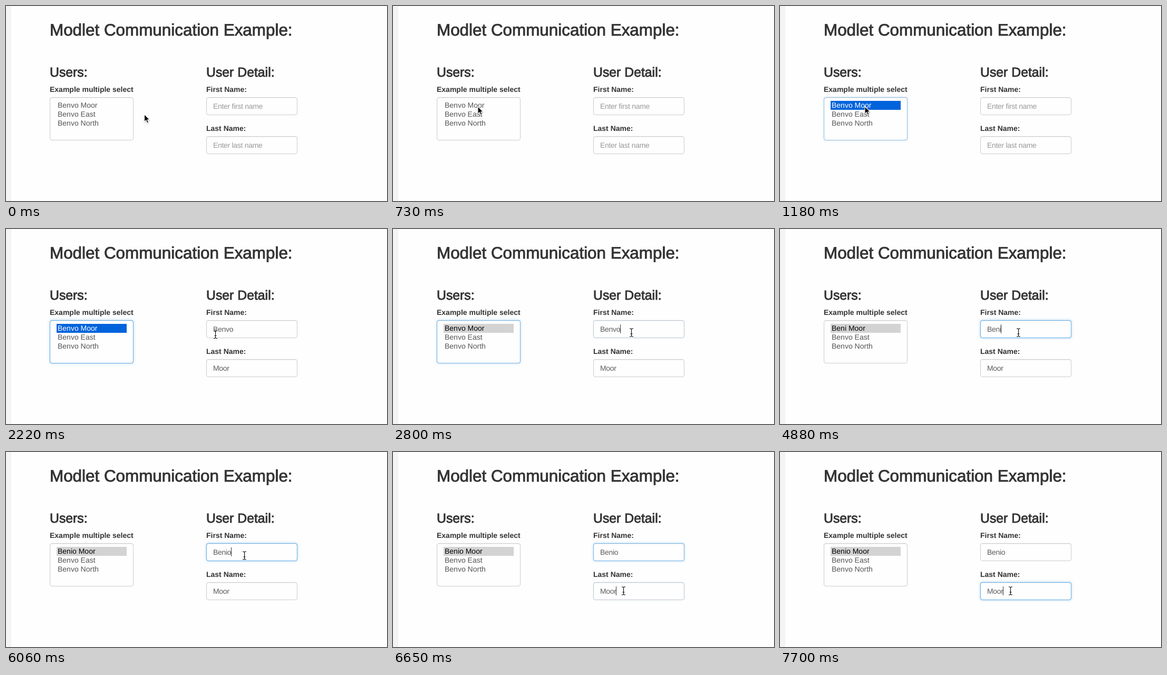
These frames come from a looping animation (723x370 px, 8 s). An HTML page:

```html
<!DOCTYPE html>
<html lang="en">
<head>
<meta charset="utf-8">
<title>Modlet Communication Example</title>
<style>
  html, body { margin: 0; width: 100%; height: 100%; overflow: hidden; background: #fefefe; }
  .strip { position: absolute; left: 0; top: 0; width: 10px; height: 100%; background: #f4f4f4; }
  .field, .ring { position: absolute; box-sizing: border-box; border-radius: 4px; }
  .field { border: 1px solid #ccc; box-shadow: inset 0 1px 1px rgba(0,0,0,.06); }
  .ring { inset: -1px; border: 1px solid #66afe9; box-shadow: 0 0 5px rgba(102,175,233,.5); opacity: 0; }
  #list { left: 83px; top: 173px; width: 159px; height: 82px; }
  #first, #last { left: 380px; width: 173px; height: 34px; }
  #first { top: 173px; }
  #last { top: 247px; }
  svg { position: absolute; left: 0; top: 0; }
  text { font-family: "Liberation Sans", Arial, sans-serif; font-size: 14px; fill: #555; text-rendering: geometricPrecision; }
  .head { fill: #333; stroke: #333; stroke-width: .9px; }
  .label { font-weight: bold; fill: #333; }
  .value { letter-spacing: -.3px; }
</style>
</head>
<body>
<div class="strip"></div>
<div class="field" id="list"><div class="ring"></div></div>
<div class="field" id="first"><div class="ring"></div></div>
<div class="field" id="last"><div class="ring"></div></div>
<svg width="723" height="370" viewBox="0 0 723 370">
  <text class="head" x="83" y="56" style="font-size:31.4px">Modlet Communication Example:</text>
  <text class="head" x="83" y="134" style="font-size:24.8px">Users:</text>
  <text class="head" x="380" y="134" style="font-size:24.8px">User Detail:</text>
  <text class="label" x="83" y="163">Example multiple select</text>
  <text class="label" x="380" y="163">First Name:</text>
  <text class="label" x="380" y="237">Last Name:</text>
  <rect id="mark" x="96" y="180" width="133" height="17"/>
  <text id="option" x="98" y="193"></text>
  <text x="98" y="210">Benvo East</text>
  <text x="98" y="227">Benvo North</text>
  <text id="firstText" class="value" x="393" y="195"></text>
  <text id="lastText" class="value" x="393" y="269"></text>
  <rect id="caret" width="1" height="17" fill="#333"/>
  <path id="arrow" d="M0 0V14.2L3.3 11.2 5.6 16.4 8 15.3 5.8 10.3H10.2Z" fill="#000" stroke="#fff" stroke-width="1.1" stroke-linejoin="round" style="filter:drop-shadow(0 1px 1px rgba(0,0,0,.3))"/>
  <g id="beam" fill="none" stroke-linecap="square">
    <path d="M-3 -7.5H-1.5L0 -6.5 1.5 -7.5H3M0 -6.5V6.5M-3 7.5H-1.5L0 6.5 1.5 7.5H3M-1.5 2.5H1.5" stroke="#fff" stroke-width="2.6" opacity=".8"/>
    <path d="M-3 -7.5H-1.5L0 -6.5 1.5 -7.5H3M0 -6.5V6.5M-3 7.5H-1.5L0 6.5 1.5 7.5H3M-1.5 2.5H1.5" stroke="#000" stroke-width="1.1"/>
  </g>
</svg>
<script>
const LOOP = 8000;
const SURNAME = "Moor";
const $ = id => document.getElementById(id);

// Each track lists [start time, value]; values hold until the next entry.
const pointer = [
  [0, [262.5, 205.5]], [300, [240, 197]], [440, [193, 182]], [590, [165, 185]], [730, [161, 190.5]],
  [1780, [181, 184]], [1930, [246, 168]], [2070, [335, 177]],
  [2220, [397.5, 200]], [2360, [438, 197]], [2510, [452.5, 196.5]],
  [6210, [450.5, 208]], [6360, [443, 240]], [6500, [437.5, 263.5]]
];
const firstName = [
  [0, ""], [1330, "Benvo"], [3830, "Benv"], [4130, "Ben"], [4880, "Beni"], [5030, "Benio"]
];
const caretOn = [
  [0, false], [2800, true], [3240, false], [3830, true], [4730, false], [4880, true],
  [5470, false], [6060, true], [7250, false], [7700, true]
];
const focus = {
  list: [[0, 0], [1180, .55], [1330, 1], [2800, .85], [2950, 0]],
  first: [[0, 0], [2800, .15], [2950, 1], [6650, .85], [6800, 0]],
  last: [[0, 0], [6650, .15], [6800, 1]]
};

const at = (track, t) => track.findLast(([start]) => start <= t)[1];

function setValue(node, value, placeholder) {
  node.textContent = value || placeholder;
  node.style.fill = value ? "#5c5c5c" : "#999";
}

function render(t) {
  const first = at(firstName, t);
  const selected = t >= 1180, blurred = t >= 2800, onLast = t >= 6650;

  for (const id in focus) $(id).firstElementChild.style.opacity = at(focus[id], t);

  $("mark").setAttribute("fill", !selected ? "none" : blurred ? "#d3d3d3" : "#0063dc");
  $("option").textContent = `${first || "Benvo"} ${SURNAME}`;
  $("option").style.fill = !selected ? "#555" : blurred ? "#000" : "#fff";
  setValue($("firstText"), first, "Enter first name");
  setValue($("lastText"), first && SURNAME, "Enter last name");

  const edited = $(onLast ? "lastText" : "firstText");
  $("caret").setAttribute("x", 393 + Math.floor(edited.getComputedTextLength()));
  $("caret").setAttribute("y", onLast ? 255 : 181);
  $("caret").setAttribute("visibility", at(caretOn, t) ? "visible" : "hidden");

  const overText = t >= 2220;
  for (const [id, shown] of [["arrow", !overText], ["beam", overText]]) {
    $(id).setAttribute("transform", `translate(${at(pointer, t)})`);
    $(id).setAttribute("visibility", shown ? "visible" : "hidden");
  }
}

const begin = performance.now();
function tick() {
  render((performance.now() - begin) % LOOP);
  requestAnimationFrame(tick);
}
tick();
</script>
</body>
</html>
```
